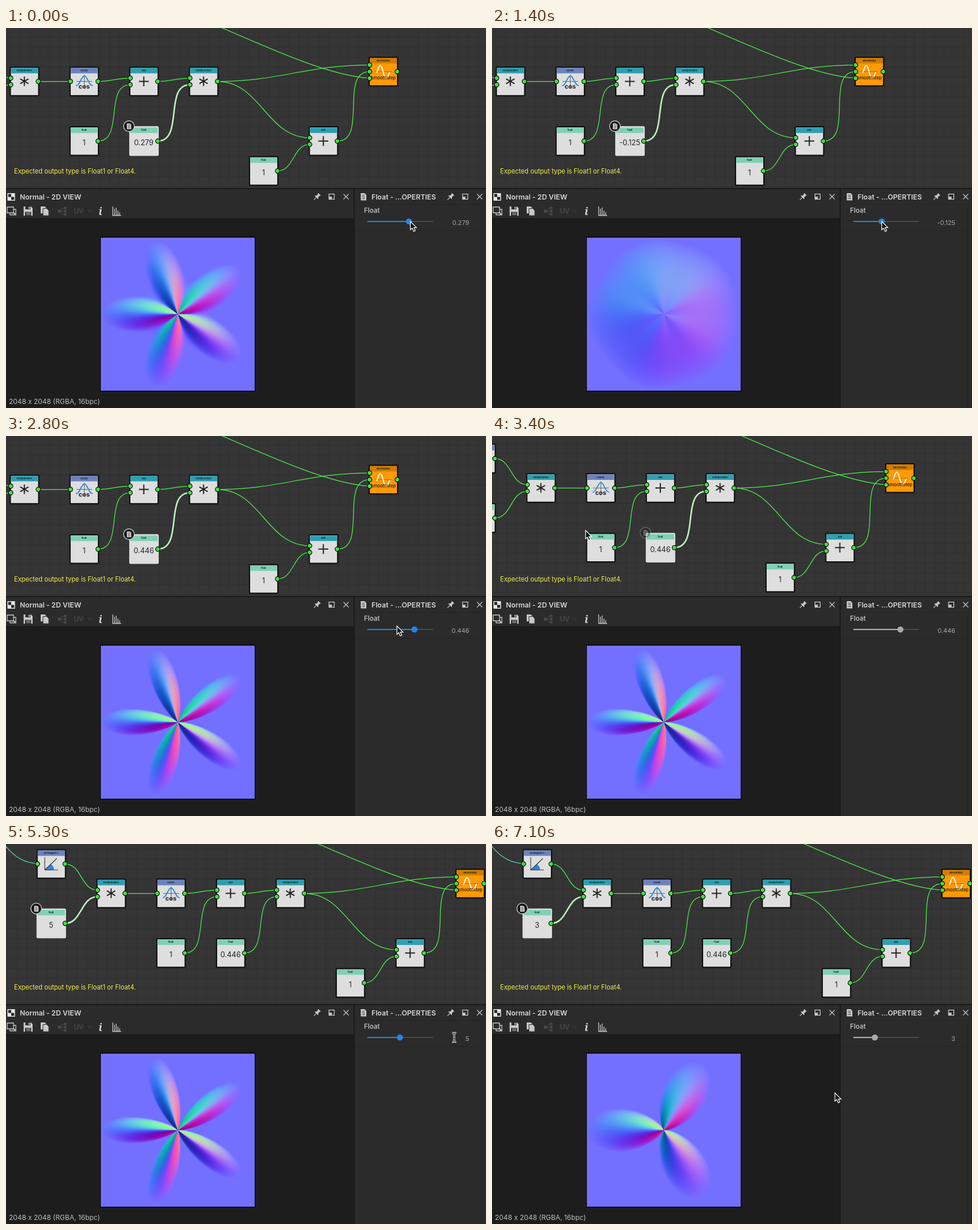
Write an HTML page with a canvas that moves like this. It is 830x658 px and loops after 7.2 s.

```html
<!DOCTYPE html>
<html lang="en">
<head>
<meta charset="utf-8">
<title>Node graph</title>
<style>
  html, body { margin: 0; width: 100%; height: 100%; overflow: hidden; background: #1d1d1d; }
  svg, canvas { position: absolute; left: 0; top: 0; display: block; }
  canvas { left: 164px; top: 363px; }
  text { font-family: Inter, Roboto, sans-serif; }
  .head { font-size: 4px; font-weight: 700; fill: #15252b; text-anchor: middle; }
  .num { font-size: 12.6px; fill: #222; text-anchor: middle; }
  .title { font-size: 12.2px; font-weight: 600; fill: #d6d6d6; }
  .wire { fill: none; stroke: #4cf04c; stroke-width: 1.25; }
  .wire.on { stroke: #bdf2bd; stroke-width: 2.6; }
  .frame { fill: #dedede; stroke: #0b0b0b; stroke-width: 2; }
  .on .frame { stroke: #dedede; }
  .ink { fill: none; stroke: #222; stroke-width: 2; }
  .line { fill: none; stroke: #c8c8c8; stroke-width: 1.3; }
</style>
</head>
<body>
<svg id="ui" width="830" height="658" viewBox="0 0 830 658">
  <defs>
    <pattern id="grid" x="6.5" y="67" width="17.22" height="17.22" patternUnits="userSpaceOnUse">
      <rect width="18" height="18" fill="#353535"/>
      <path d="M0 .5H18M.5 0V18" stroke="#2f2f2f"/>
    </pattern>
    <g id="doc">
      <path d="M-4.5-6H2L5-3V6.5H-4.5Z" fill="#d2d2d2"/>
      <path d="M-2.5-2.5H2.5M-2.5 .5H3M-2.5 3.5H3" stroke="#2b2b2b"/>
    </g>
    <g id="pin" transform="rotate(45)">
      <path d="M-3-6H3V-5L2-4V-1L4 1V2H-4V1L-2-1V-4L-3-5Z" fill="#c8c8c8"/>
      <path d="M0 2V8" class="line"/>
    </g>
    <g id="dock">
      <rect x="-4.5" y="-4.5" width="9" height="9" class="line"/>
      <rect x="-4.5" y="0" width="5" height="4.5" fill="#c8c8c8"/>
    </g>
    <path id="close" d="M-4.5-4.5L4.5 4.5M4.5-4.5L-4.5 4.5" class="line"/>
  </defs>

  <g id="graph">
    <rect x="-240" y="-40" width="1120" height="380" fill="url(#grid)"/>
    <path class="wire" d="M340-15C450 33 560 84 629 86.5"/>
    <path class="wire" style="stroke:#5fceb0" d="M-156 3C-138 30-118 40-95.5 41"/>
    <g id="wires"></g>
    <g id="nodes"></g>
    <g id="badge">
      <circle r="9.3" fill="#161616" stroke="#c4c4c4" stroke-width="1.4"/>
      <use href="#doc" transform="scale(.8)"/>
    </g>
  </g>
  <text x="14" y="251.5" font-size="11.1" fill="#f6ee48">Expected output type is Float1 or Float4.</text>

  <path d="M0 277H830V658H0Z" fill="#1a1a1a"/>
  <path d="M0 279H601V329H0ZM603 279H830V658H603Z" fill="#2b2b2b"/>
  <path d="M0 330H601V658H0Z" fill="#1d1d1d"/>
  <path d="M603 305.5H822M603 350.5H822M822.5 305V658" stroke="#242424" fill="none"/>

  <rect x="2.5" y="286" width="13" height="13" fill="#e4e4e4"/>
  <path d="M4 287.500H9V292.500H4ZM9 292.500H14V297.500H9Z" fill="#222"/>
  <text class="title" x="24" y="296.500">Normal - 2D VIEW</text>
  <text class="title" x="632" y="296.500">Float - ...OPERTIES</text>
  <use href="#doc" x="618" y="292"/>
  <g id="tools"></g>

  <g class="line">
    <path d="M2 310H13V320H2ZM7 320V323.500H17V314H13"/>
    <path d="M12 319L17 323.500" stroke-width="2"/>
  </g>
  <path d="M30.500 309H43L46 312V325H30.500Z" fill="#c8c8c8"/>
  <path d="M33.500 309V314H42V309M33 325V318.500H43.500V325" fill="#2b2b2b"/>
  <path d="M39 310H41V313H39ZM35 320H42V321H35ZM35 322.500H42V323.500H35Z" fill="#c8c8c8"/>
  <path d="M60 309H67L70 312V321H60Z" fill="#c8c8c8"/>
  <path d="M64 312.500H70.500L74 316V325H64Z" fill="#c8c8c8" stroke="#2b2b2b"/>
  <g stroke="#4b4b4b" fill="#4b4b4b">
    <path d="M91 317H104M94 317L98 312H104M94 317L98 322H104" fill="none"/>
    <path d="M90 315H94V319H90ZM101 310H104V313H101ZM101 315.500H104V318.500H101ZM101 321H104V324H101Z"/>
    <path d="M141 315.500L144 318.500L147 315.500" fill="none"/>
  </g>
  <text x="117.500" y="321" font-size="11.500" fill="#565656">UV</text>
  <text x="160" y="323.500" style="font:italic 700 18px 'Noto Serif',serif" fill="#d0d0d0">i</text>
  <path d="M184.500 309V324.500H199M187.500 324V313M190.500 324V311M193.500 324V316M196.500 324V319" class="line" stroke-width="1.8"/>

  <rect x="163" y="361.500" width="268" height="268" fill="#050505"/>
  <text id="info" x="5" y="650.500" font-size="11.900" fill="#bdbdbd">2048 x 2048 (RGBA, 16bpc)</text>

  <text x="619" y="320" font-size="11.400" font-weight="600" fill="#b9b9b9">Float</text>
  <path d="M625 335H738.500" stroke="#484848" stroke-width="2"/>
  <path id="fill" stroke-width="2"/>
  <circle id="knob" cy="335" r="5.300"/>
  <text id="value" x="801" y="340.500" font-size="10.900" fill="#a6a6a6" text-anchor="end"></text>
</svg>
<canvas id="map" width="266" height="265"></canvas>
<svg id="top" width="830" height="658" viewBox="0 0 830 658">
  <path id="arrow" d="M0 0V14.500L3.300 11.600L5.700 17.200L8.400 16L6 10.600H10.500Z" fill="#111" stroke="#fff" stroke-width="1.200"/>
  <g id="beam" fill="none">
    <path d="M-3.500-8Q0-8 0-5.500Q0-8 3.500-8M0-6V6M-3.500 8Q0 8 0 5.500Q0 8 3.500 8M-2 2H2" stroke="#fff" stroke-width="2.800"/>
    <path d="M-3.500-8Q0-8 0-5.500Q0-8 3.500-8M0-6V6M-3.500 8Q0 8 0 5.500Q0 8 3.500 8M-2 2H2" stroke="#111" stroke-width="1.100"/>
  </g>
  <path id="resize" d="M-3 0L2-5V-1.500H8V1.500H2V5Z" fill="#111" stroke="#fff" stroke-width="1.200"/>
</svg>
<script>
const $ = id => document.getElementById(id);
const LOOP = 7200, STEP = 100;

// ---- graph ----
const TEAL = '#2f9fb0', BLUE = '#6d82bd', MINT = '#80d0b4';
const STAR = '<path class="ink" d="M25 17V33.500M17.800 21.200L32.200 29.300M32.200 21.200L17.800 29.300"/>';
const PLUS = '<path class="ink" d="M25 17V34M16.500 25.500H33.500"/>';
const COS = `<path d="M12 25.500H39M25.500 14V38" stroke="#444" stroke-width=".8"/>
  <path d="M11 33C18 33 20 16 25.500 16S33 33 40 33" fill="none" stroke="#2a86e0" stroke-width="1.800"/>
  <text x="25.300" y="37.500" font-size="11" font-weight="700" text-anchor="middle" fill="#222">cos</text>`;
const ATAN = `<path d="M14 36L25 26Q30 30 30 36Z" fill="#2a86e0"/>
  <path d="M14 14V36H37M14 36L35 16" fill="none" stroke="#333" stroke-width="1.100"/>`;
const SMOOTH = `<path d="M10 25.500H40" stroke="#7a4a00" stroke-width=".8" stroke-dasharray="2 1"/>
  <path d="M13 27C16 27 16 15 20 15S25 36 30 36S34 27 37 27" fill="none" stroke="#fff" stroke-width="1.800"/>
  <text x="25.500" y="39" font-size="7.500" font-weight="500" text-anchor="middle" fill="#221400">smoothstep</text>`;
const num = s => `<text class="num" x="25" y="33">${s}</text>`;

// x, y, header colour, header text, content, number of inputs
const nodes = {
  atan: [-97, 16, BLUE, 'arctangent 2', ATAN, 1],
  five: [-97, 119, MINT, 'float', num(5), 0],
  mul: [6.7, 67, TEAL, 'multiplication', STAR, 2],
  cos: [110, 67, BLUE, 'cosine', COS, 1],
  one: [110, 170.300, MINT, 'float', num(1), 0],
  add: [213.300, 67, TEAL, 'add', PLUS, 2],
  amp: [213.300, 170.300, MINT, 'float', num(''), 0],
  mul2: [316.600, 67, TEAL, 'multiplication', STAR, 2],
  one2: [420.300, 222, MINT, 'float', num(1), 0],
  add2: [523.700, 170.300, TEAL, 'add', PLUS, 2],
  step: [627.300, 50, '#d47c00', 'smoothstep', SMOOTH, 3]
};
const inY = (count, i) => 25.500 + (i - (count - 1) / 2) * 11.500;
const port = (x, y) => `<circle cx="${x}" cy="${y}" r="3.800" fill="#45df45" stroke="#0d160d" stroke-width="1.300"/>`;

$('nodes').innerHTML = Object.entries(nodes).map(([id, [x, y, tint, name, body, ins]]) => `
  <g id="${id}" transform="translate(${x} ${y})">
    <rect class="frame" x=".8" y=".8" width="49" height="49.400" rx="1.500" ${id === 'step' ? 'style="fill:#ff9a05"' : ''}/>
    <rect x="1.800" y="2" width="47" height="9.500" fill="${tint}"/>
    <text class="head" x="25" y="8.200">${name}</text>${body}
    ${Array.from({ length: ins }, (_, i) => port(1.400, inY(ins, i))).join('')}${port(49.200, 25.500)}
  </g>`).join('');

const links = [
  ['atan', 'mul', 0], ['five', 'mul', 1], ['mul', 'cos', 0], ['cos', 'add', 0],
  ['one', 'add', 1], ['add', 'mul2', 0], ['amp', 'mul2', 1], ['mul2', 'step', 0],
  ['mul2', 'add2', 0], ['one2', 'add2', 1], ['add2', 'step', 1]
];
$('wires').innerHTML = links.map(([from, to, i]) => {
  const a = nodes[from], b = nodes[to];
  const x1 = a[0] + 49.200, y1 = a[1] + 25.500, x2 = b[0] + 1.400, y2 = b[1] + inY(b[5], i);
  const c = Math.hypot(x2 - x1, y2 - y1) * 0.4;
  return `<path id="${from}-${to}" class="wire" d="M${x1} ${y1}C${x1 + c} ${y1} ${x2 - c} ${y2} ${x2} ${y2}"/>`;
}).join('');

$('tools').innerHTML = [538, 769].map(x =>
  ['pin', 'dock', 'close'].map((s, i) => `<g transform="translate(${x + i * 25} 292)"><use href="#${s}"/></g>`).join('')).join('');

// ---- normal map of smoothstep(v, v + 1, 1 - r), v = amp * (1 + cos(n * angle)) ----
const ctx = $('map').getContext('2d');
const tone = (base, n) => n > 0 ? base + (255 - base) * n : base * (1 + n);
let drawn = '';

function drawMap(n, amp) {
  const key = n + ':' + amp;
  if (key === drawn) return;
  drawn = key;
  const W = 266, H = 265, R = 133, K = 0.25;
  const img = ctx.createImageData(W, H);
  for (let j = 0, p = 0; j < H; j++) {
    for (let i = 0; i < W; i++, p += 4) {
      const x = (i + 0.5 - R) / R, y = (H / 2 - j - 0.5) / R;
      const r = Math.hypot(x, y) || 1e-3, a = Math.atan2(y, x);
      const u = 1 - r - amp * (1 + Math.cos(n * a));
      const slope = r < 1 && u > 0 && u < 1 ? 6 * u * (1 - u) * K : 0;
      const turn = amp * n * Math.sin(n * a) / r;
      const nx = slope * (x + turn * y) / r, ny = slope * (y - turn * x) / r;
      const len = Math.hypot(nx, ny, 1);
      img.data[p] = tone(115, nx / len);
      img.data[p + 1] = tone(112, ny / len);
      img.data[p + 2] = 127 + 128 / len;
      img.data[p + 3] = 255;
    }
  }
  ctx.putImageData(img, 0, 0);
}

// ---- timeline ----
function track(keys, t) {
  let k = keys.findIndex(key => key[0] > t);
  if (k < 0) return keys[keys.length - 1].slice(1);
  const a = keys[k - 1], b = keys[k], s = (t - a[0]) / (b[0] - a[0]);
  const e = s * s * (3 - 2 * s);
  return a.slice(1).map((v, i) => v + (b[i + 1] - v) * e);
}
const ampKeys = [[0, 0.279], [1400, -0.125], [1600, -0.125], [2500, 0.446]];
const mapKeys = [[0, 0.279], [1400, 0.02], [1700, 0.02], [2600, 0.446]];
const panKeys = [[0, 0, 0], [3200, 0, 0], [3700, 150, -7]];
const mouseKeys = [
  [2500, 707, 335], [2800, 676, 329], [3200, 109, 166], [3700, 259, 159], [3900, 259, 159],
  [4300, 78, 140], [4500, 78, 140], [5200, 775, 335], [5900, 775, 335], [6300, 826, 331],
  [6500, 826, 331], [7000, 593, 431]
];

function place(id, show, x, y) {
  $(id).setAttribute('display', show ? 'inline' : 'none');
  $(id).setAttribute('transform', `translate(${x} ${y})`);
}

function render(t) {
  const amp = track(ampKeys, t)[0], label = amp.toFixed(3);
  const [px, py] = track(panKeys, t);
  const late = t >= 4300, typed = t >= 6000, applied = t >= 6500;
  const knob = !late ? 681 + 56.500 * amp : typed ? 662 : 681;
  const [mx, my] = t < 2500 ? [knob + 2.500 * (1 - Math.min(t, 1400) / 1400), 335] : track(mouseKeys, t);
  const hover = mx > 608 && mx < 815 && my > 305 && my < 350;

  $('graph').setAttribute('transform', `translate(${px} ${py})`);
  $('amp').querySelector('.num').textContent = label;
  $('five').querySelector('.num').textContent = applied ? 3 : 5;
  for (const [id, wire, on] of [['amp', 'amp-mul2', !late], ['five', 'five-mul', late]]) {
    $(id).classList.toggle('on', on);
    $(wire).classList.toggle('on', on);
  }
  const sel = nodes[late ? 'five' : 'amp'];
  place('badge', true, sel[0] - 0.7, sel[1] - 0.3);
  $('badge').setAttribute('opacity', t >= 3200 && !late ? 0.35 : 1);

  $('value').textContent = late ? (typed ? 3 : 5) : label;
  $('fill').setAttribute('d', `M625 335H${knob}`);
  $('fill').setAttribute('stroke', hover ? '#2384e8' : '#b4b4b4');
  $('knob').setAttribute('cx', knob);
  $('knob').setAttribute('fill', hover ? '#2384e8' : '#a9a9a9');
  const busy = (t >= 1000 && t < 1900) || (t >= 2400 && t < 2600);
  $('info').setAttribute('display', busy ? 'none' : 'inline');

  drawMap(applied ? 3 : 5, track(mapKeys, t)[0]);

  const beam = hover && mx > 755, edge = mx > 818;
  place('arrow', !beam && !edge, mx, my);
  place('beam', beam, mx, my);
  place('resize', edge, mx, my);
}

let last = -1;
function tick() {
  const t = Math.floor(performance.now() % LOOP / STEP) * STEP;
  if (t !== last) render(last = t);
  requestAnimationFrame(tick);
}
tick();
</script>
</body>
</html>
```
